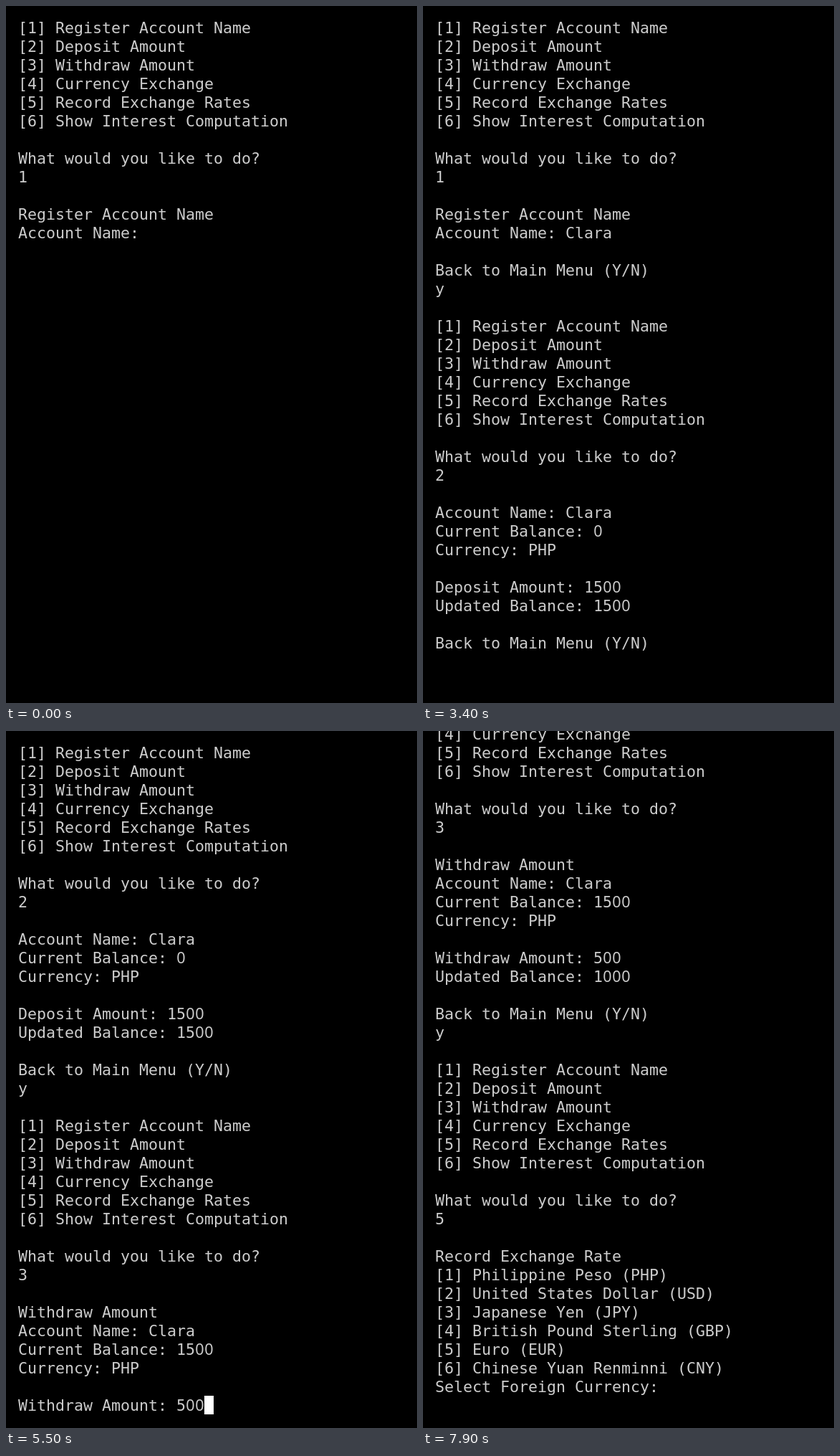
Write an HTML page with a canvas that moves like this. It is 574 px wide and 972 px high and loops after 8000 ms.

```html
<!DOCTYPE html>
<html lang="en">
<head>
<meta charset="utf-8">
<title>Bank console</title>
<style>
  html, body { margin: 0; width: 100%; height: 100%; overflow: hidden; background: #000; }
  canvas { display: block; }
</style>
</head>
<body>
<canvas id="screen" width="574" height="972"></canvas>
<script>
const ctx = document.getElementById('screen').getContext('2d');
const LOOP = 8000, CELL = 13, LINE = 26, PAD = 17, ROWS = 36;
const FONT = '21.6px "DejaVu Sans Mono", monospace';
const ZERO_FONT = '21.6px "Noto Sans", sans-serif'; // zero without a slash or dot
const NAME = 'Clara';

const list = items => items.map((item, i) => `[${i + 1}] ${item}`).join('\n');

const menu = list([
  'Register Account Name', 'Deposit Amount', 'Withdraw Amount',
  'Currency Exchange', 'Record Exchange Rates', 'Show Interest Computation'
]) + '\n\nWhat would you like to do?\n';

const currencies = list([
  'Philippine Peso (PHP)', 'United States Dollar (USD)', 'Japanese Yen (JPY)',
  'British Pound Sterling (GBP)', 'Euro (EUR)', 'Chinese Yuan Renminni (CNY)'
]);

const account = balance =>
  `Account Name: ${NAME}\nCurrent Balance: ${balance}\nCurrency: PHP\n\n`;
const updated = balance => `\nUpdated Balance: ${balance}`;
const back = '\n\nBack to Main Menu (Y/N)\n';

// [time in ms, text added to the console, cursor visible]
const steps = [
  [0, menu + '1\n\nRegister Account Name\nAccount Name: ', false],
  [700, NAME[0], true],
  [800, NAME[1], true],
  [900, NAME.slice(2, 4), true],
  [1000, NAME[4], true],
  [1200, back, false],
  [1300, '', true],
  [1600, 'y', true],
  [1700, '\n\n' + menu, false],
  [2700, '2', true],
  [2800, '\n\n' + account(0) + 'Deposit Amount: ', true],
  [2900, '1', true],
  [3000, '50', true],
  [3100, '0', true],
  [3400, updated(1500) + back, false],
  [4000, 'y', true],
  [4100, '\n\n' + menu, true],
  [4500, '', false],
  [5000, '3', true],
  [5200, '\n\nWithdraw Amount\n' + account(1500) + 'Withdraw Amount: ', true],
  [5300, '5', true],
  [5400, '0', true],
  [5500, '0', true],
  [6000, updated(1000) + back, true],
  [6100, 'y', true],
  [6800, '\n\n' + menu, true],
  [7000, '5', true],
  [7700, '\n\nRecord Exchange Rate\n' + currencies + '\nSelect Foreign Currency:\n', false]
];

function drawLine(line, y) {
  [...line].forEach((char, col) => {
    ctx.font = char === '0' ? ZERO_FONT : FONT;
    ctx.fillText(char, PAD + (col + 0.5) * CELL, y);
  });
}

function draw(time) {
  const done = steps.filter(step => step[0] <= time);
  const lines = done.map(step => step[1]).join('').split('\n');
  const last = lines.length - 1;
  const scroll = Math.max(0, lines.length - ROWS);
  const top = i => PAD + (i - scroll) * LINE;

  ctx.fillStyle = '#000';
  ctx.fillRect(0, 0, 574, 972);
  ctx.fillStyle = '#ccc';
  ctx.textAlign = 'center';
  lines.forEach((line, i) => drawLine(line, top(i) + 21));

  if (done[done.length - 1][2]) {
    ctx.fillStyle = '#fff';
    ctx.fillRect(PAD + lines[last].length * CELL, top(last), CELL, LINE);
  }
}

function tick() {
  draw(performance.now() % LOOP);
  requestAnimationFrame(tick);
}
tick();
</script>
</body>
</html>
```
